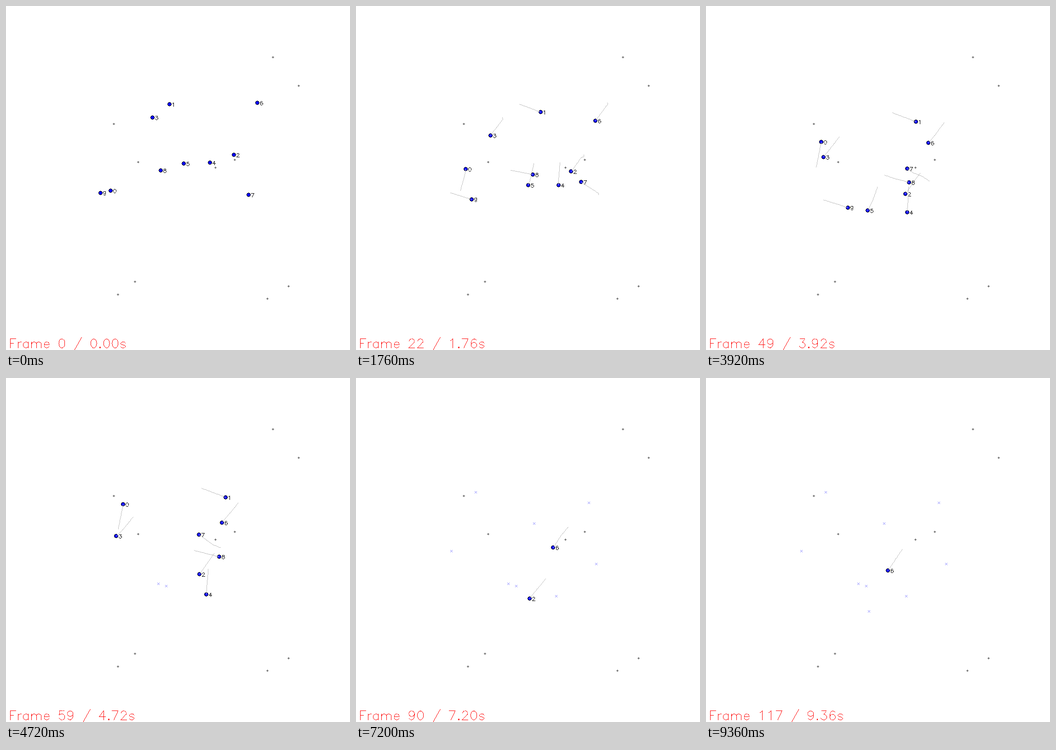
These frames come from a looping animation (748x748 px, 9.44 s). A matplotlib script:

```python
import numpy as np
import matplotlib.pyplot as plt
from matplotlib.animation import FuncAnimation

SIZE, FRAMES, STEP = 748, 118, 80
SPEED, TRAIL, ARRIVED = 2.21, 25, 2.8
RADIUS = 4

BLACK, BLUE, RED = (0, 0, 0), (0, 0, 255), (255, 0, 0)
GREY, TRAIL_GREY, GOAL_BLUE = (128, 128, 128), (192, 192, 192), (128, 128, 255)

LANDMARKS = [(580, 111), (636, 173), (234, 256), (287, 339), (497, 334),
             (455, 351), (280, 599), (243, 627), (614, 609), (568, 636)]

# Each agent walks from its first point to its goal, the last point
ROUTES = [
    [(227, 401.5), (236, 369.5), (260, 248)],
    [(355.5, 213.3), (478, 259.3), (506, 271)],
    [(495, 323.5), (496, 328), (490, 329), (453, 380.5), (421, 426.5), (354, 507)],
    [(318, 242.3), (319.5, 246), (268, 312.7), (253, 331), (207, 376)],
    [(443.5, 340.6), (441, 373.6), (440, 415), (435, 474)],
    [(386.5, 342.6), (380, 373.6), (361.5, 425.7), (348, 452)],
    [(546.3, 210.5), (547.5, 213), (497, 281.7), (445.2, 343.2),
     (428.5, 369.6), (389.5, 428)],
    [(527.8, 410.7), (526.5, 406.5), (469, 369.7), (450, 362.5), (387, 316)],
    [(336.8, 357.3), (384.5, 366.3), (410, 375), (522, 404)],
    [(205, 406), (290.2, 432.2), (331, 447)],
]


def arc(cx, cy, rx, ry, start, end):
    n = max(4, int(abs(end - start) / 22))
    a = np.radians(np.linspace(start, end, n + 1))
    return list(zip(cx + rx * np.cos(a), cy + ry * np.sin(a)))


BOWL = arc(10, 6.5, 7, 6.5, 90, -160)
SIX = arc(11, 10, 7, 11, 45, 180) + [(4, 7)] + arc(10.5, 6.5, 6.5, 6.5, 180, 540)
NINE = [(20 - x, 21 - y) for x, y in SIX]
ARCH = arc(9.5, 9, 5.5, 5, 170, 0) + [(15, 0)]
STEM = [(4, 14), (4, 0)]

# Stroke font on a 21 unit cap height: (advance, strokes)
GLYPHS = {
    " ": (16, []),
    ".": (10, [arc(5, 1, 1, 1, 0, 360)]),
    "/": (22, [[(20, 25), (2, -7)]]),
    "0": (20, [arc(10, 10.5, 7, 10.5, 0, 360)]),
    "1": (20, [[(6, 17), (8, 18), (11, 21), (11, 0)]]),
    "2": (20, [arc(10, 15.5, 6, 5.5, 175, -35) + [(3, 0), (17, 0)]]),
    "3": (20, [[(5, 21), (16, 21), (10, 13)] + BOWL]),
    "4": (20, [[(13, 0), (13, 21), (3, 7), (18, 7)]]),
    "5": (20, [[(15, 21), (5, 21), (4, 12)] + arc(10, 7, 7, 7, 140, -155)]),
    "6": (20, [SIX]),
    "7": (20, [[(3, 21), (17, 21), (7, 0)]]),
    "8": (20, [arc(10, 16.75, 6, 4.25, 0, 360), arc(10, 6.25, 7, 6.25, 0, 360)]),
    "9": (20, [NINE]),
    "F": (18, [[(17, 21), (4, 21), (4, 0)], [(4, 11), (12, 11)]]),
    "r": (13, [STEM, arc(11, 7, 7, 7, 170, 90) + [(12, 14)]]),
    "a": (19, [[(15, 14), (15, 0)], arc(9.5, 7, 6.5, 7, 35, 325)]),
    "m": (30, [STEM, ARCH, [(x + 11, y) for x, y in ARCH]]),
    "e": (18, [[(3, 8), (15, 8)] + arc(9, 7, 6.1, 7, 8, 325)]),
    "s": (17, [arc(8.5, 10.5, 5.5, 3.5, 10, 270) + arc(8.5, 3.5, 5.5, 3.5, 90, -170)]),
}


def plot(img, x, y, color):
    x = np.floor(np.asarray(x) + 0.5).astype(int)
    y = np.floor(np.asarray(y) + 0.5).astype(int)
    ok = (x >= 0) & (x < SIZE) & (y >= 0) & (y < SIZE)
    img[y[ok], x[ok]] = color


def polyline(img, pts, color):
    for (x0, y0), (x1, y1) in zip(pts, pts[1:]):
        n = max(1, int(round(max(abs(x1 - x0), abs(y1 - y0)))))
        plot(img, np.linspace(x0, x1, n + 1), np.linspace(y0, y1, n + 1), color)


def text(img, string, x, y, scale, color):
    for ch in string:
        advance, strokes = GLYPHS[ch]
        for stroke in strokes:
            polyline(img, [(x + u * scale, y - v * scale) for u, v in stroke], color)
        x += advance * scale


GRID_Y, GRID_X = np.mgrid[-RADIUS:RADIUS + 1, -RADIUS:RADIUS + 1]
DIST2 = GRID_X ** 2 + GRID_Y ** 2
DISC = DIST2 <= RADIUS ** 2 + 2
CORE = DIST2 <= (RADIUS - 1) ** 2 + 1
DIAMOND = abs(GRID_X) + abs(GRID_Y) <= 2


def stamp(img, mask, x, y, color):
    plot(img, x + GRID_X[mask], y + GRID_Y[mask], color)


def cross(img, x, y, color):
    polyline(img, [(x - 2, y - 2), (x + 2, y + 2)], color)
    polyline(img, [(x - 2, y + 2), (x + 2, y - 2)], color)


def walk(route):
    """Pixel position in every frame and the frame of arrival."""
    pts = np.array(route, float)
    along = np.append(0, np.cumsum(np.hypot(*np.diff(pts, axis=0).T)))
    d = SPEED * np.arange(FRAMES)
    track = np.column_stack([np.interp(d, along, c) for c in pts.T])
    end = int(np.ceil((along[-1] - ARRIVED) / SPEED))
    return np.floor(track).astype(int), end


WALKS = [walk(route) for route in ROUTES]

backdrop = np.full((SIZE, SIZE, 3), 255, np.uint8)
for px, py in LANDMARKS:
    stamp(backdrop, DIAMOND, px, py, GREY)


def render(i):
    img = backdrop.copy()
    for route, (_, end) in zip(ROUTES, WALKS):
        if i >= end:
            cross(img, *route[-1], GOAL_BLUE)
    for k, (track, end) in enumerate(WALKS):
        if i < end:
            x, y = track[i]
            stamp(img, DISC, x, y, BLACK)
            stamp(img, CORE, x, y, BLUE)
            polyline(img, track[max(0, i - TRAIL):i + 1], TRAIL_GREY)
            text(img, str(k), x + 5, y + 5, 0.4, BLACK)
    text(img, f"Frame {i} / {i * STEP / 1000:.2f}s", 5, SIZE - 5, SIZE / 800, RED)
    return img


fig = plt.figure(figsize=(8.5, 8.5), dpi=88)
ax = fig.add_axes([0, 0, 1, 1])
ax.axis("off")
view = ax.imshow(render(0), interpolation="nearest", aspect="auto")


def update(i):
    view.set_data(render(i))
    return [view]


anim = FuncAnimation(fig, update, frames=FRAMES, interval=STEP,
                     repeat=True, repeat_delay=0)
plt.show()
```
